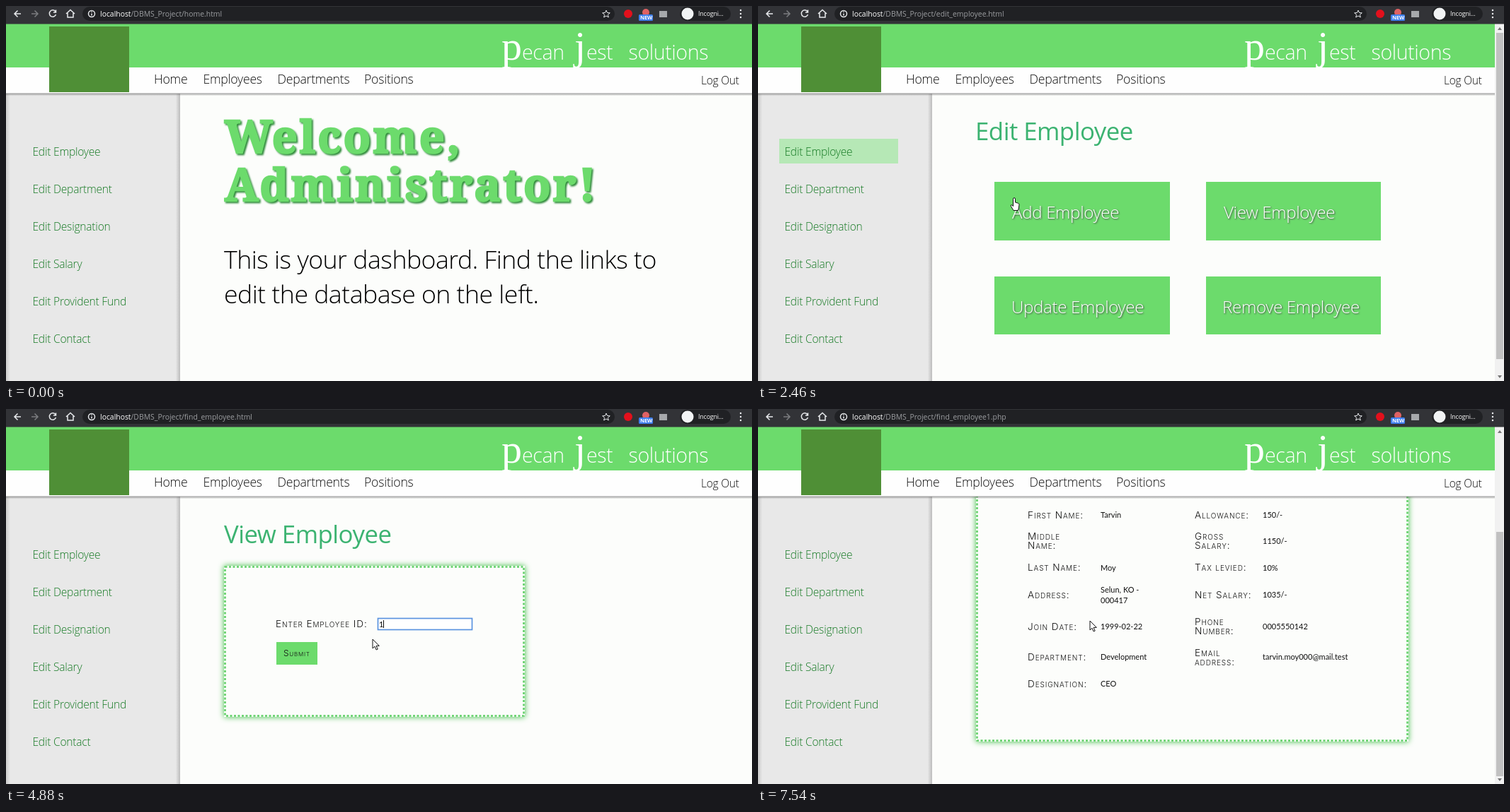
These frames come from a looping animation (1054x531 px, 8000 ms). An HTML page:

```html
<!DOCTYPE html>
<html lang="en">
<head>
<meta charset="utf-8">
<title>Employee dashboard</title>
<style>
html, body { margin: 0; width: 100%; height: 100%; overflow: hidden; background: #fcfdfb; }
svg { display: block; width: 100%; height: 100%; }
text { font: 300 15.6px "Open Sans", sans-serif; letter-spacing: -.015em; white-space: pre; }

.nav text { font-size: 17.7px; fill: #111; }
.nav .logout { font-size: 15.5px; }
.brand text { font-size: 28.6px; fill: #fff; }
.brand .initial { font: 58px "Liberation Serif", serif; }
.side text { fill: #167a24; }
.welcome { font: 700 63px "Noto Serif", serif; letter-spacing: 3.2px; fill: #6cdb6c; stroke: #6cdb6c; stroke-width: 2.4px; filter: drop-shadow(2px 2px 1px #2f8a3a); }
.message { font-size: 35.7px; fill: #000; }
.title { font-size: 34.8px; font-weight: 400; fill: #3cb371; }
.card rect, .submit { fill: #6cdb6c; }
.card text { font-size: 24.2px; fill: #fff; filter: drop-shadow(1px 1px 1px #444); }
.panel { fill: #fcfdfb; filter: drop-shadow(0 0 4px #3dbb45); }
.dots { fill: none; stroke: #5fd065; stroke-width: 2.5px; stroke-dasharray: 3 2.5; }
.label text, text.label { font: 300 13.6px Inter, sans-serif; font-variant: small-caps; letter-spacing: .065em; fill: #111; }
text.small { font-size: 12px; }
.value text, text.value { font: 400 11px Lato, sans-serif; letter-spacing: 0; fill: #111; }
.url text { font-size: 10.4px; font-weight: 400; fill: #9b9da0; letter-spacing: 0; }
.url .host { fill: #fff; font-weight: 500; }
.status rect { fill: #2b2c2f; }
.status text { font-size: 8.75px; font-weight: 400; fill: #c4c6c9; letter-spacing: 0; }
.icon { fill: none; stroke: #e8eaed; stroke-width: 1.5px; }

/* one percent is 80 ms */
.step { animation: 8s step-end infinite; }
.home { animation-name: home; }
.edit { animation-name: edit; }
.find { animation-name: find; }
.detail { animation-name: detail; }
.dock { animation-name: dock; }
.status-edit { animation-name: status-edit; }
.status-find { animation-name: status-find; }
.focus { animation-name: focus; }
.empty { animation-name: empty; }
.typed { animation-name: typed; }
.arrow { animation-name: arrow; }
.hand { animation-name: hand; }
.beam { animation-name: beam; }
.hover { animation: hover 8s linear infinite; }
.scroll { animation: scroll 8s ease-in-out infinite; }
.thumb { animation: thumb 8s ease-in-out infinite; }
.pointer { animation: pointer 8s ease-in-out infinite; }

@keyframes home { 0% { opacity: 1 } 21.875%, 100% { opacity: 0 } }
@keyframes edit { 0% { opacity: 0 } 21.875% { opacity: 1 } 42.75%, 100% { opacity: 0 } }
@keyframes find { 0% { opacity: 0 } 42.75% { opacity: 1 } 66.75%, 100% { opacity: 0 } }
@keyframes detail { 0% { opacity: 0 } 66.75%, 100% { opacity: 1 } }
@keyframes dock {
  0%, 42.75% { transform: none }
  21.875%, 66.75%, 100% { transform: translateX(-13px) }
}
@keyframes status-edit { 0% { opacity: 0 } 14.4% { opacity: 1 } 25.6%, 100% { opacity: 0 } }
@keyframes status-find { 0% { opacity: 0 } 39.5% { opacity: 1 } 46%, 100% { opacity: 0 } }
@keyframes focus { 0% { opacity: 0 } 50.5%, 100% { opacity: 1 } }
@keyframes empty { 0% { opacity: 0 } 50.5% { opacity: 1 } 56.25%, 100% { opacity: 0 } }
@keyframes typed { 0% { opacity: 0 } 56.25%, 100% { opacity: 1 } }
@keyframes arrow {
  0%, 12%, 29.75%, 38.5%, 45.6% { opacity: 0 }
  .75%, 25.6%, 37%, 42.75%, 58.6%, 100% { opacity: 1 }
}
@keyframes hand {
  0%, 25.6%, 37%, 42.75%, 100% { opacity: 0 }
  12%, 29.75%, 38.5% { opacity: 1 }
}
@keyframes beam { 0% { opacity: 0 } 45.6% { opacity: 1 } 58.6%, 100% { opacity: 0 } }
@keyframes hover { 0%, 11.9% { opacity: 0 } 15%, 28.125% { opacity: 1 } 33.4%, 100% { opacity: 0 } }
@keyframes scroll {
  0%, 84.375% { transform: none }
  88%, 90% { transform: translateY(-100px) }
  94%, 100% { transform: translateY(-200px) }
}
@keyframes thumb {
  0%, 84.375% { transform: none }
  88%, 90% { transform: translateY(68px) }
  94%, 100% { transform: translateY(136px) }
}
@keyframes pointer {
  0%, .75% { transform: translate(420px, 330px) }
  10.5% { transform: translate(110px, 222px) }
  16.25%, 22.5% { transform: translate(88px, 206px) }
  30.75% { transform: translate(362px, 272px) }
  32.4% { transform: translate(366px, 274px) }
  40.5%, 44.25% { transform: translate(640px, 308px) }
  51.6%, 56.25% { transform: translate(575px, 304px) }
  61% { transform: translate(518px, 326px) }
  65.6%, 78.125% { transform: translate(412px, 338px) }
  81.25%, 100% { transform: translate(469px, 300px) }
}
</style>
</head>
<body>
<svg viewBox="0 0 1054 531" preserveAspectRatio="none">
  <defs>
    <linearGradient id="sideEdge">
      <stop offset="0" stop-color="#cacaca"/><stop offset=".025" stop-color="#e8e8e8"/>
      <stop offset=".975" stop-color="#e8e8e8"/><stop offset="1" stop-color="#bcbcbc"/>
    </linearGradient>
    <linearGradient id="fall" x2="0" y2="1">
      <stop offset="0" stop-color="#555" stop-opacity=".6"/><stop offset="1" stop-color="#777" stop-opacity="0"/>
    </linearGradient>
  </defs>
  <rect width="1054" height="531" fill="#fcfdfb"/>

  <g class="step home">
    <text class="welcome" x="309" y="208">Welcome,</text>
    <text class="welcome" x="309" y="276">Administrator!</text>
    <text class="message" x="308" y="372">This is your dashboard. Find the links to</text>
    <text class="message" x="308" y="421">edit the database on the left.</text>
  </g>

  <g class="step edit">
    <text class="title" x="307" y="190">Edit Employee</text>
    <g class="card">
      <rect x="334" y="249" width="248" height="83"/><text x="359" y="301">Add Employee</text>
      <rect x="633" y="249" width="247" height="83"/><text x="658" y="301">View Employee</text>
      <rect x="334" y="383" width="248" height="82"/><text x="358" y="435">Update Employee</text>
      <rect x="633" y="383" width="247" height="82"/><text x="656" y="435">Remove Employee</text>
    </g>
  </g>

  <g class="step find">
    <text class="title" x="308" y="190">View Employee</text>
    <rect class="panel" x="308" y="222" width="425" height="214"/>
    <rect class="dots" x="309.5" y="223.5" width="422" height="211"/>
    <text class="label" x="381" y="309">Enter Employee ID:</text>
    <rect x="525.5" y="296.5" width="133" height="16" fill="#fff" stroke="#aaa"/>
    <rect class="step focus" x="525.5" y="296.5" width="133" height="16" fill="#fff" stroke="#5b93e0" stroke-width="1.7"/>
    <path class="step empty" d="M528.5 299v11" stroke="#111"/>
    <g class="step typed">
      <text class="value" x="527" y="308.5">1</text>
      <path d="M533.5 299v11" stroke="#111"/>
    </g>
    <rect class="submit" x="382" y="330" width="58" height="32"/>
    <text class="label small" x="392" y="349.5">Submit</text>
  </g>

  <g class="step detail">
    <g class="scroll">
      <text class="title" x="308" y="190">View Employee</text>
      <rect class="panel" x="308" y="237" width="611" height="434"/>
      <rect class="dots" x="309.5" y="238.5" width="608" height="431"/>
      <g class="label">
        <text x="381" y="322.5">Employee ID:</text>
        <text x="381" y="354.5">First Name:</text>
        <text x="381" y="385">Middle</text>
        <text x="381" y="398">Name:</text>
        <text x="381" y="429">Last Name:</text>
        <text x="381" y="468">Address:</text>
        <text x="381" y="512.5">Join Date:</text>
        <text x="381" y="556">Department:</text>
        <text x="381" y="593.5">Designation:</text>
        <text x="617" y="322.5">Basic:</text>
        <text x="617" y="354.5">Allowance:</text>
        <text x="617" y="385">Gross</text>
        <text x="617" y="398">Salary:</text>
        <text x="617" y="429">Tax levied:</text>
        <text x="617" y="468">Net Salary:</text>
        <text x="617" y="506">Phone</text>
        <text x="617" y="519">Number:</text>
        <text x="617" y="549.5">Email</text>
        <text x="617" y="562.5">address:</text>
      </g>
      <g class="value">
        <text x="484" y="322">1</text>
        <text x="484" y="354">Tarvin</text>
        <text x="484" y="429">Moy</text>
        <text x="484" y="460">Selun, KO -</text>
        <text x="484" y="475">000417</text>
        <text x="484" y="512">1999-02-22</text>
        <text x="484" y="555">Development</text>
        <text x="484" y="593">CEO</text>
        <text x="713" y="322">1000/-</text>
        <text x="713" y="354">150/-</text>
        <text x="713" y="391">1150/-</text>
        <text x="713" y="429">10%</text>
        <text x="713" y="467">1035/-</text>
        <text x="713" y="512">0005550142</text>
        <text x="713" y="555">tarvin.moy000@mail.test</text>
      </g>
    </g>
  </g>

  <g class="side">
    <rect y="124" width="246" height="407" fill="url(#sideEdge)"/>
    <rect class="hover" x="30" y="188" width="168" height="35" fill="#85ea85"/>
    <text x="37.5" y="212">Edit Employee</text>
    <text x="37.5" y="265">Edit Department</text>
    <text x="37.5" y="318">Edit Designation</text>
    <text x="37.5" y="371">Edit Salary</text>
    <text x="37.5" y="424">Edit Provident Fund</text>
    <text x="37.5" y="477">Edit Contact</text>
  </g>

  <rect y="25" width="1054" height="62" fill="#6cdb6c"/>
  <rect y="87" width="1054" height="37" fill="#fefefe"/>
  <rect y="123.5" width="1054" height="4" fill="url(#fall)"/>
  <rect x="61" y="29" width="113" height="93" fill="#4f8f36"/>
  <g class="nav">
    <text x="209" y="110">Home</text>
    <text x="278.5" y="110">Employees</text>
    <text x="383.5" y="110">Departments</text>
    <text x="506" y="110">Positions</text>
    <text class="logout step dock" x="982" y="111">Log Out</text>
  </g>
  <g class="brand step dock">
    <text class="initial" x="700" y="76">p</text><text x="729" y="76">ecan</text>
    <text class="initial" x="803" y="76">j</text><text x="820" y="76">est</text>
    <text x="879.5" y="76">solutions</text>
  </g>

  <g class="bars">
    <g class="step edit">
      <rect x="1041" y="25" width="13" height="506" fill="#f1f1f1"/>
      <path d="M1045 34l3-4 3 4zM1045 523l3 4 3-4z" fill="#777"/>
      <rect x="1043" y="38" width="10" height="462" fill="#c1c1c1"/>
    </g>
    <g class="step detail">
      <rect x="1041" y="25" width="13" height="506" fill="#f1f1f1"/>
      <path d="M1045 34l3-4 3 4zM1045 523l3 4 3-4z" fill="#777"/>
      <rect class="thumb" x="1043" y="38" width="10" height="346" fill="#c1c1c1"/>
    </g>
  </g>

  <g class="toolbar">
    <rect width="1054" height="25.5" fill="#323337"/>
    <rect x="108" y="1" width="752" height="20" rx="10" fill="#202124"/>
    <rect x="952" y="1" width="72" height="20" rx="10" fill="#202124"/>
    <path class="icon" d="M21 11h-9m4.5-4.5L12 11l4.5 4.5"/>
    <path class="icon" d="M36 11h9m-4.5-4.5L45 11l-4.5 4.5" stroke-opacity=".4"/>
    <path class="icon" d="M70 8a4.7 4.7 0 1 0 .5 4M70.5 5.5v3.5h-3.5"/>
    <path class="icon" d="M85 11l6-5.5 6 5.5M87 10v6h8v-6"/>
    <circle class="icon" cx="121" cy="11" r="4.5"/>
    <path class="icon" d="M121 8v1m0 1.5v3"/>
    <path class="icon" d="M848 6l1.5 3.5 3.8.3-2.9 2.5.9 3.7-3.3-2-3.3 2 .9-3.7-2.9-2.5 3.8-.3z" style="stroke-width:1px"/>
    <circle cx="879" cy="11" r="6" fill="#e3101c"/>
    <circle cx="904" cy="9" r="5" fill="#df6264"/>
    <rect x="894" y="12" width="20" height="9" rx="1.5" fill="#3f7fee"/>
    <text x="896" y="19.3" style="font-size:7.5px;font-weight:700;fill:#fff">NEW</text>
    <rect x="923" y="7" width="11" height="9" fill="#a7a9ac"/>
    <circle cx="963" cy="11" r="8.5" fill="#f1f3f4"/>
    <text x="978" y="14" style="font-size:8.8px;font-weight:400;fill:#fff">Incogni...</text>
    <path d="M1038 6v.01M1038 11v.01M1038 16v.01" stroke="#e8eaed" stroke-width="2.5" stroke-linecap="round"/>
    <g class="url">
      <text class="step home" x="133" y="15"><tspan class="host">localhost</tspan>/DBMS_Project/home.html</text>
      <text class="step edit" x="133" y="15"><tspan class="host">localhost</tspan>/DBMS_Project/edit_employee.html</text>
      <text class="step find" x="133" y="15"><tspan class="host">localhost</tspan>/DBMS_Project/find_employee.html</text>
      <text class="step detail" x="133" y="15"><tspan class="host">localhost</tspan>/DBMS_Project/find_employee1.php</text>
    </g>
  </g>

  <g class="status">
    <g class="step status-edit">
      <rect y="517" width="189" height="14"/><text x="3" y="527.5">localhost/DBMS_Project/edit_employee.html</text>
    </g>
    <g class="step status-find">
      <rect y="517" width="190" height="14"/><text x="3" y="527.5">localhost/DBMS_Project/find_employee.html</text>
    </g>
  </g>

  <g class="pointer" fill="#fff" stroke="#111">
    <path class="step arrow" d="M0 0v13l3-2.8 2.2 4.8 2-.9-2.1-4.7h4.2z"/>
    <path class="step hand" d="M-1.5 9V1.2a1.5 1.5 0 0 1 3 0V6l4 1.2q1.7.5 1.5 2.3l-.6 4.5-1 3.5h-6.4L-4.6 11.5q-.8-2 1-1.8l2.1 1.8z"/>
    <path class="step beam" d="M-2.5-7.5h5M0-7.5v15M-2.5 7.5h5" fill="none"/>
  </g>
</svg>
</body>
</html>
```
